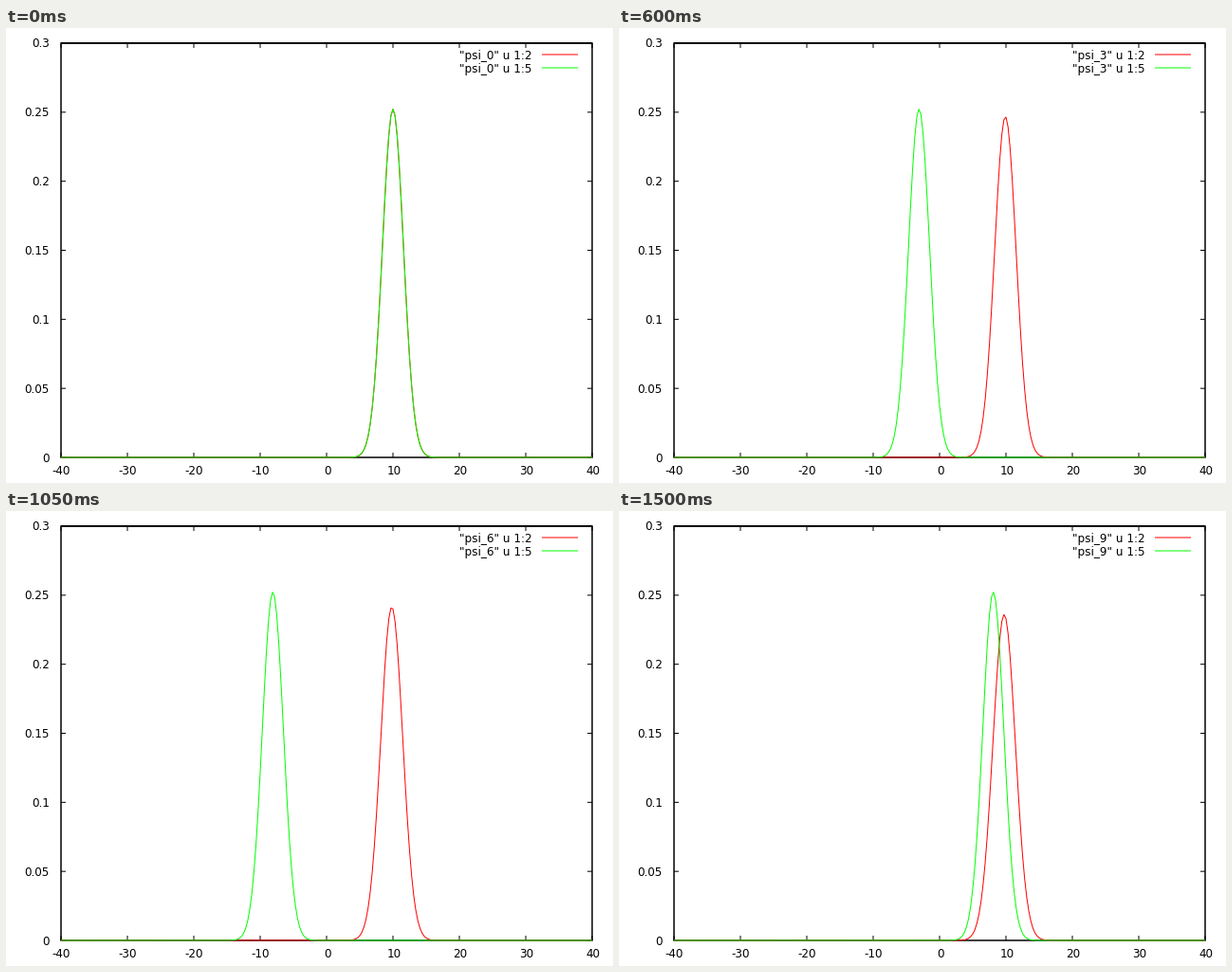
These frames come from a looping animation (640 by 480 pixels, 1650 ms). A matplotlib script:

```python
import numpy as np
import matplotlib.pyplot as plt
from matplotlib.animation import FuncAnimation

plt.rcParams["font.family"] = "DejaVu Sans"
plt.rcParams["path.snap"] = False

DPI = 100
PX = 72 / DPI
LEFT, RIGHT, TOP, BOTTOM = 58, 618, 16, 453
TICK = 5
STEPS = [0, 10, *range(1, 10)]  # files play in alphabetical order
RED, GREEN = "#ff0000", "#00ff00"

fig = plt.figure(figsize=(640 / DPI, 480 / DPI), dpi=DPI, facecolor="white")
ax = fig.add_axes([0, 0, 1, 1])
ax.set(xlim=(0, 640), ylim=(480, 0))
ax.axis("off")


def to_px(x, y):
    return (LEFT + (x + 40) * (RIGHT - LEFT) / 80,
            BOTTOM - y * (BOTTOM - TOP) / 0.3)


def line(xs=(), ys=(), color="black", width=1.0, z=2):
    return ax.plot(xs, ys, color=color, lw=width * PX, zorder=z,
                   solid_capstyle="butt", solid_joinstyle="miter")[0]


def label(x, y, text, align):
    return ax.text(x, y, text, size=12 * PX, ha=align, va="baseline")


def packet(x, center, peak):
    sigma = 1 / (peak * np.sqrt(2 * np.pi))
    return peak * np.exp(-((x - center) / sigma) ** 2 / 2)


for value in range(-40, 41, 10):
    px, _ = to_px(value, 0)
    line([px, px], [BOTTOM, BOTTOM - TICK])
    line([px, px], [TOP, TOP + TICK])
    label(px + (1 if value >= 0 else 0), 471, str(value), "center")

for i in range(7):
    _, py = to_px(0, i * 0.05)
    line([LEFT, LEFT + TICK], [py, py])
    line([RIGHT, RIGHT - TICK], [py, py])
    label(46, py + 4.5, f"{i * 0.05:.2g}", "right")

line([LEFT, RIGHT, RIGHT, LEFT, LEFT, RIGHT],
     [TOP, TOP, BOTTOM, BOTTOM, TOP, TOP], width=1.5)

grid = np.linspace(-40, 40, 257)
red_curve = line(color=RED, z=3)
green_curve = line(color=GREEN, z=4)
keys = []
for row, (color, column) in enumerate([(RED, 2), (GREEN, 5)]):
    y = 28 + 14 * row
    line([565, 603], [y, y], color)
    keys.append((label(554.5, y + 5, "", "right"), column))


def update(frame):
    t = STEPS[frame]
    red = packet(grid, 10 - 0.03 * t, 0.2523 - 0.0018 * t)
    green = packet(grid, 10 * np.cos(2 * np.pi * t / 10), 0.2523)
    red_curve.set_data(*to_px(grid, red))
    green_curve.set_data(*to_px(grid, green))
    for text, column in keys:
        text.set_text(f'"psi_{t}" u 1:{column}')
    return red_curve, green_curve, *(text for text, _ in keys)


anim = FuncAnimation(fig, update, frames=len(STEPS), interval=150,
                     repeat=True, repeat_delay=0)
plt.show()
```
